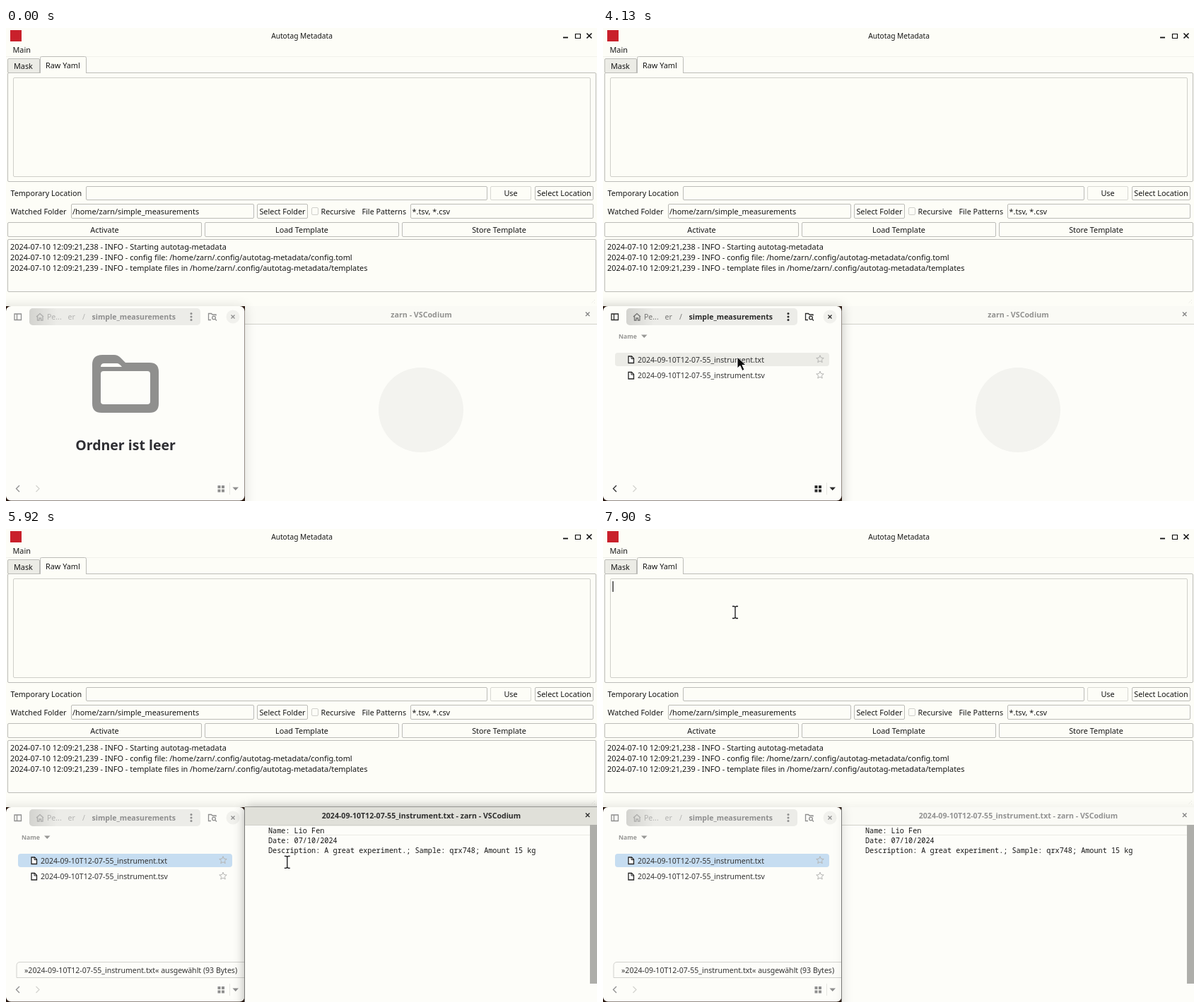
Write an HTML page that moves like this. It is 836 px wide and 670 px high and loops after 8000 ms.

```html
<!DOCTYPE html>
<html lang="en">
<head>
<meta charset="utf-8">
<title>Autotag Metadata</title>
<style>
html, body { margin: 0; width: 100%; height: 100%; overflow: hidden; background: #fdfdf7; }
svg { display: block; }
text { font-family: "Noto Sans", "Open Sans", sans-serif; fill: #161616; }
.mono { font-family: "Noto Sans Mono", "DejaVu Sans Mono", monospace; }
.bold { font-weight: 700; }
.mid { text-anchor: middle; }
.icon { fill: none; stroke: currentColor; stroke-width: 1.3; }
.ink, .ink text { fill: currentColor; }
</style>
</head>
<body>
<svg id="stage" width="836" height="670" viewBox="0 0 836 670"></svg>
<script>
const LOOP = 8000;
const BG = '#fdfdf7', PANE = '#fdfdf9', EDGE = '#bcbcb8', UI = 10.85, FM = 10.5;

const text = (x, y, s, size = UI, cls = '', attr = '') =>
  `<text x="${x}" y="${y}" font-size="${size}" class="${cls}" ${attr}>${s}</text>`;
const rect = (x, y, w, h, fill, attr = '') =>
  `<rect x="${x}" y="${y}" width="${w}" height="${h}" fill="${fill}" ${attr}/>`;
const frame = (x, y, w, h, stroke = EDGE, fill = 'none', r = 1.5) =>
  rect(x + .5, y + .5, w - 1, h - 1, fill, `stroke="${stroke}" rx="${r}"`);
const path = (d, attr = '') => `<path d="${d}" ${attr}/>`;
const group = (id, body, attr = '') => `<g id="${id}" ${attr}>${body}</g>`;
const button = (x, y, w, h, label, edge = EDGE) =>
  frame(x, y, w, h, edge) + text(x + w / 2, y + h / 2 + 4, label, UI, 'mid');

const HOME = '/home/zarn';
const FILE = '2024-09-10T12-07-55_instrument';

function tagger() {
  const log = [
    '238 - INFO - Starting autotag-metadata',
    `239 - INFO - config file: ${HOME}/.config/autotag-metadata/config.toml`,
    `239 - INFO - template files in ${HOME}/.config/autotag-metadata/templates`
  ];
  return rect(6, 3, 16, 16, '#c9202b') +
    text(418.5, 14.5, 'Autotag Metadata', 10.2, 'mid') +
    path('M788 13.5h7', 'stroke="#111" stroke-width="1.8"') +
    path('M805.5 8.5h7v6h-7z M805 8.5h8', 'fill="none" stroke="#111" stroke-width="1.2"') +
    path('M821.5 7.5l7 7m0-7l-7 7', 'stroke="#111" stroke-width="1.6"') +
    text(9.5, 35, 'Main') +
    path('M0 40.5H836', 'stroke="#f1f1eb"') +
    frame(2, 63, 833, 155) +
    frame(2, 43, 46, 21, EDGE, '#ecece6') +
    path('M48.5 64V42.5q0-2 2-2h61q2 0 2 2V64', `fill="${BG}" stroke="${EDGE}"`) +
    rect(49, 63, 64, 2, BG) +
    text(11, 57.5, 'Mask') + text(56, 57, 'Raw Yaml') +
    frame(10, 70, 817, 141, '#cfcfc9') +
    text(6.5, 238, 'Temporary Location', 10.75) + frame(113, 224, 568, 20) +
    button(685, 224, 58, 20, 'Use', '#d8d8d3') + button(748, 224, 83, 20, 'Select Location') +
    text(6.5, 263.5, 'Watched Folder', 10.75) + frame(92, 249, 259, 21) +
    text(94, 263.5, HOME + '/simple_measurements') +
    button(355, 249, 72, 21, 'Select Folder') +
    frame(432, 254, 10, 11, '#d0d0cb') +
    text(445.5, 263.5, 'Recursive', 10.75) + text(503.5, 263.5, 'File Patterns', 10.75) +
    frame(572, 249, 259, 21) + text(574.5, 263.5, '*.tsv, *.csv') +
    button(2, 275, 275, 21, 'Activate') +
    button(281, 275, 275, 21, 'Load Template') +
    button(560, 275, 275, 21, 'Store Template') +
    frame(2, 299, 833, 75) +
    log.map((s, i) => text(6, 314 + 15.2 * i, '2024-07-10 12:09:21,' + s, 10.92)).join('') +
    path('M833 385l-5 5m5-1l-1 1', 'stroke="#e2e2dd" stroke-dasharray="1 1.5"') +
    group('fieldCaret', rect(13.5, 74, 1.2, 15, '#111'));
}

function editor() {
  const lines = ['Name: Lio Fen', 'Date: 07/10/2024',
    'Description: A great experiment.; Sample: qrx748; Amount 15 kg'];
  return rect(338, 394, 498, 276, PANE) +
    rect(338, 394, 498, 25, '#fafaf5') +
    group('titleOn', rect(338, 394, 498, 25, '#e0e0d9') + rect(338, 393, 498, 1, '#b4b4ae')) +
    rect(338, 419, 498, 1, '#d2d2cb') +
    group('blank', `<circle cx="587" cy="541" r="60" fill="#f3f3ef"/>` +
      text(587.5, 409.5, 'zarn - VSCodium', 10.7, 'bold mid', 'style="fill:#929290"')) +
    group('doc',
      lines.map((s, i) => text(371, 430.5 + 14 * i, s, 10.18, 'mono')).join('') +
      path('M371 420.5H826M371 433.5H826', 'stroke="#ebebe5"') +
      rect(826, 419, 10, 225, '#aeaeaa') +
      group('docTitle', text(587.5, 409.5, FILE + '.txt - zarn - VSCodium', 10.58, 'bold mid ink'))) +
    group('editClose', path('M820 402.5l5.5 5.5m0-5.5l-5.5 5.5', 'class="icon"')) +
    group('caret', rect(370.5, 419.5, 1.4, 13.5, '#111'));
}

function star(cx, cy) {
  const pts = Array.from({ length: 10 }, (_, i) => {
    const r = i % 2 ? 2.5 : 5.5, a = (i / 5 - .5) * Math.PI;
    return (cx + r * Math.cos(a)).toFixed(1) + ',' + (cy + r * Math.sin(a)).toFixed(1);
  });
  return `<polygon points="${pts.join(' ')}" fill="none" stroke="#b4b4b2"/>`;
}

function row(y, ext) {
  return path(`M36 ${y - 4.5}h4.5l3 3v6.5h-7.5z`, 'fill="#fff" stroke="#222" stroke-width="1.3"') +
    path(`M40 ${y - 4.5}v3.5h3.5`, 'fill="none" stroke="#222"') +
    text(49, y + 4, FILE + ext, FM, '', 'style="fill:#333"') + star(307, y - .3);
}

function files() {
  const folder = 'M136 463H153Q158 463 162 467L169 474H203Q216 474 216 487V532Q216 545 203 545' +
    'H135Q122 545 122 532V477Q122 463 136 463Z' +
    'M138 486Q134 486 134 490V529Q134 533 138 533H200Q204 533 204 529V490Q204 486 200 486Z' +
    'M134 480Q134 475 139 475H157Q160 475 164 480Z';
  const bar =
    path('M12 405h9.5v8.5h-9.5zM15.5 405v8.5', 'class="icon"') +
    path('M43 409l5-4.5 5 4.5M44.5 408v6h2.5v-3h2.5v3h2.5v-6', 'class="icon" opacity=".6"') +
    text(58, 413, 'Pe...', FM, 'ink', 'opacity=".6"') + text(87.5, 413, 'er', FM, 'ink', 'opacity=".6"') +
    text(108, 413, '/', FM, 'ink', 'opacity=".6"') +
    text(121.5, 413, 'simple_measurements', 10.55, 'bold ink') +
    [404.5, 409, 413.5].map(y => `<circle cx="262" cy="${y}" r="1.5" class="ink"/>`).join('') +
    path('M290 413.5h-3.5v-9h4l1.5 1.5h5v1.5', 'class="icon"') +
    `<circle cx="294" cy="410.5" r="2.3" class="icon"/>` + path('M296 412.5l2 2', 'class="icon"') +
    path('M318.5 406.500l5 5m0-5l-5 5', 'class="icon"') +
    path('M19 648l-4.5 4.5 4.5 4.5', 'class="icon"') +
    path('M299.5 648h4v4h-4zM305 648h4v4h-4zM299.5 653.5h4v4h-4zM305 653.5h4v4h-4zM320.5 650.5h8.5l-4.25 4.5z', 'class="ink"');
  return rect(0, 394, 338, 276, '#2b1a12') +
    rect(0, 394, 337.5, 275.5, PANE, 'rx="7"') +
    rect(33, 397, 242, 24, '#ecece8', 'rx="5"') +
    rect(33, 397, 40, 24, 'url(#pillFade)', 'rx="5"') +
    `<circle cx="321" cy="409" r="9.5" fill="#f1f1ed"/>` +
    group('bar', bar) +
    path('M42.5 648l4.5 4.5-4.5 4.5', 'fill="none" stroke="#d4d4d0" stroke-width="1.3"') +
    path('M316.5 644v17', 'stroke="#e6e6e2"') +
    group('empty', path(folder, 'fill="#8f8f8e" fill-rule="evenodd"') +
      text(169, 597.5, 'Ordner ist leer', 19.5, 'bold mid', 'style="fill:#2e2e33"')) +
    group('list',
      text(22, 440, 'Name', 8.7, 'bold', 'style="fill:#979795"') +
      path('M54 434.5h8.5l-4.25 4.5z', 'fill="#979795"') +
      group('mark', rect(17, 460, 303, 19, 'currentColor', 'rx="4"')) +
      row(469.5, '.txt') + row(492, '.tsv')) +
    group('toast', path('M337.5 613.5H20q-5 0-5 5v17h322.5', `fill="${PANE}" stroke="#d2d2ce"`) +
      text(26, 628.5, `»${FILE}.txt« ausgewählt (93 Bytes)`, 10.56, '', 'style="fill:#333"'));
}

const defs = `<defs>
<linearGradient id="pillFade"><stop stop-color="#d3d3cf"/><stop offset="1" stop-color="#ecece8"/></linearGradient>
<filter id="soft" x="-20%" y="-20%" width="140%" height="140%"><feGaussianBlur stdDeviation="8"/></filter>
<clipPath id="outFiles"><path d="M0 373H372V670H338V394H0z"/></clipPath>
<clipPath id="outEditor"><path d="M310 373H836V394H338V670H310z"/></clipPath>
</defs>`;

const stage = document.getElementById('stage');
stage.innerHTML = defs + rect(0, 0, 836, 670, BG) + tagger() + editor() + files() +
  group('filesShade', rect(-30, 394, 369, 310, '#000', 'filter="url(#soft)"'), 'clip-path="url(#outFiles)"') +
  group('editShade', rect(338, 394, 530, 310, '#000', 'filter="url(#soft)"'), 'clip-path="url(#outEditor)"') +
  group('editEdge', rect(337, 394, 1, 276, '#777775')) +
  group('arrow', path('M0 0V16L4 12.5 7 19.5 10 18 7 11.5H12.2Z',
    'fill="#0c0c0c" stroke="#fff" stroke-width="1" stroke-linejoin="round"')) +
  group('beam', ['#fff" stroke-width="3', '#111" stroke-width="1.3'].map(s =>
    `<path d="M-4 -8.5H-1.5L0 -7.5 1.5 -8.5H4M-4 8.5H-1.5L0 7.5 1.5 8.5H4M0 -8V8" fill="none" stroke="${s}"/>`).join(''));

const el = {};
stage.querySelectorAll('g[id]').forEach(g => el[g.id] = g);

const clamp = v => Math.max(0, Math.min(1, v));
const ease = v => v * v * (3 - 2 * v);
const easeOut = v => 1 - (1 - v) ** 2;
const fade = (t, a, b, curve = ease) => curve(clamp((t - a) / (b - a)));
const show = (id, on) => { el[id].style.display = on ? '' : 'none'; };
const alpha = (id, v) => { el[id].style.opacity = v; };
const grey = (from, to, k) => {
  const v = Math.round(from + (to - from) * k);
  return `rgb(${v},${v},${v})`;
};

// Pointer stops: time, x, y; equal places hold, a 1 ms gap jumps.
const stops = [
  [3030, 832, 534], [3700, 190, 466], [5550, 190, 466], [5950, 401, 472],
  [6860, 401, 472], [6890, 390, 470], [7089, 390, 470],
  [7090, 266, 162], [7560, 187, 118], [LOOP, 187, 118]
];

function pointer(t) {
  const i = stops.findIndex(s => s[0] > t);
  if (i < 1) return null;
  const [a, x, y] = stops[i - 1], [b, u, v] = stops[i];
  const k = fade(t, a, b, i === 1 ? easeOut : ease);
  return [x + (u - x) * k, y + (v - y) * k];
}

function draw(t) {
  const listed = t >= 2320, picked = t >= 5080, opened = t >= 5250;
  const filesOn = (t >= 4100 ? 1 : 0) * (1 - fade(t, 5120, 5360));
  const filesDepth = fade(t, 4070, 4370, easeOut) * (1 - fade(t, 5120, 5380));
  const editOn = fade(t, 5090, 5370) * (1 - fade(t, 7600, 7870));

  show('empty', !listed);
  show('list', listed);
  show('toast', picked);
  show('blank', !opened);
  show('doc', opened);
  show('editEdge', picked);
  show('fieldCaret', t >= 7600);
  show('caret', opened && t < 7600 && (t - 5180) % 990 < 495);

  el.bar.style.color = grey(142, 42, filesOn);
  el.docTitle.style.color = grey(146, 46, editOn);
  el.editClose.style.color = grey(130, 40, editOn);
  alpha('titleOn', editOn);
  alpha('filesShade', .12 + .24 * filesDepth);
  alpha('editShade', picked ? .06 + .28 * editOn : 0);

  const pos = pointer(t);
  const hover = pos && pos[0] >= 17 && pos[0] < 320 && pos[1] >= 460 && pos[1] < 480;
  show('mark', picked || hover);
  el.mark.style.color = picked ? (hover ? '#b4d0ea' : '#c6ddf1') : '#ecece7';

  const beam = pos && t > 5550 && pos[0] > 338 || t >= 7090;
  show('arrow', pos && !beam);
  show('beam', pos && beam);
  if (pos) el[beam ? 'beam' : 'arrow'].setAttribute('transform', `translate(${pos[0].toFixed(1)} ${pos[1].toFixed(1)})`);
  // The editor covers the neighbour's shadow once it is raised.
  el.filesShade.setAttribute('clip-path', editOn > .5 ? 'url(#outEditorLeft)' : 'url(#outFiles)');
}

stage.querySelector('defs').insertAdjacentHTML('beforeend',
  '<clipPath id="outEditorLeft"><path d="M0 373H338V394H0z"/></clipPath>');

const start = performance.now();
function tick() {
  draw((performance.now() - start) % LOOP);
  requestAnimationFrame(tick);
}
tick();
</script>
</body>
</html>
```
